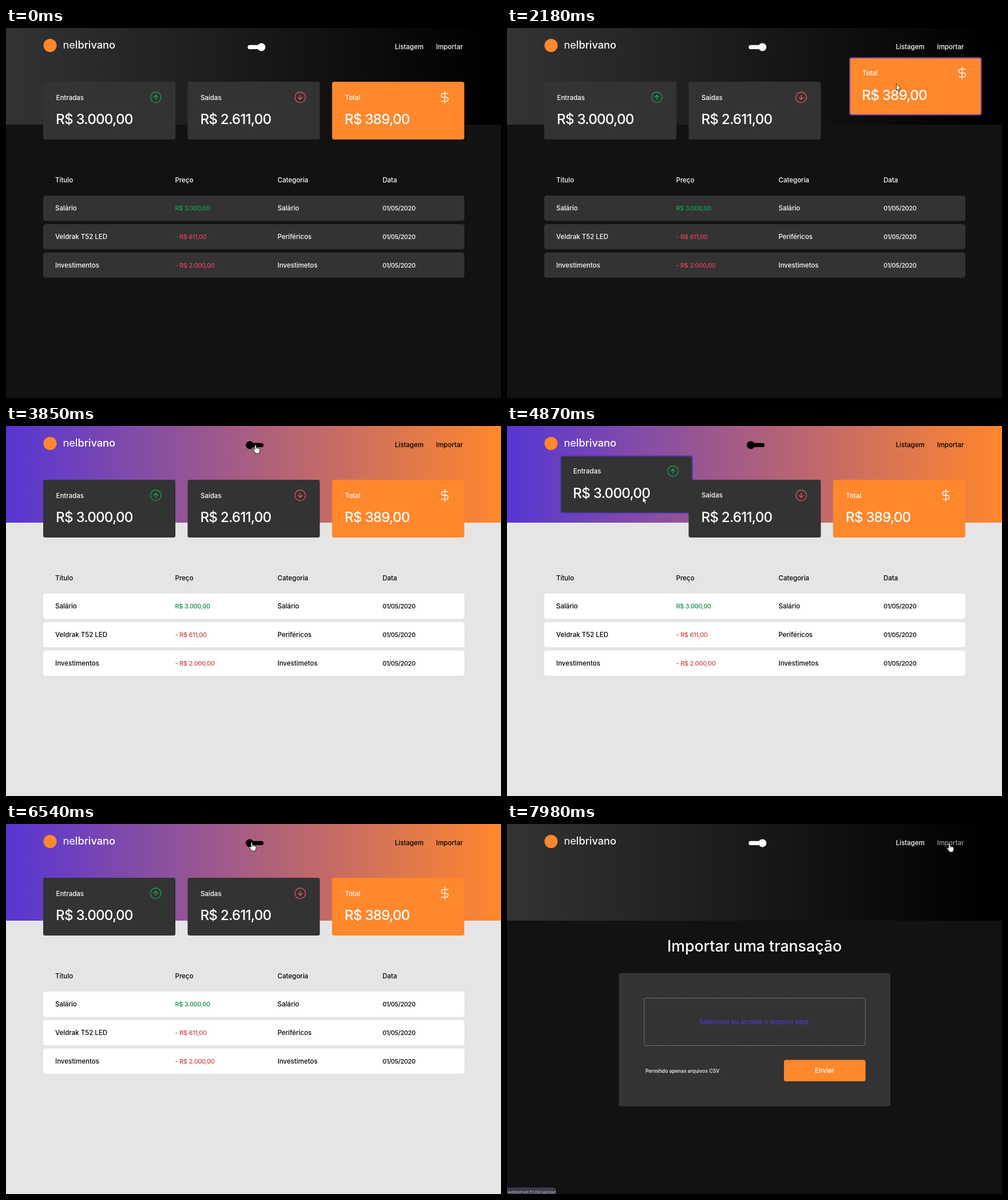
Recreate the animation shown at these times as an HTML page. Size 865 by 647 pixels, loop 8 s.

```html
<!DOCTYPE html>
<html lang="pt-BR">
<head>
<meta charset="utf-8">
<title>Painel</title>
<style>
  html, body { margin: 0; width: 100%; height: 100%; overflow: hidden; background: #121214; }
  svg { display: block; width: 100vw; height: 100vh; --ink: #fff; --row: #333; --in: #12a454; --out: #e83f5b; }
  svg.light { --ink: #000; --row: #fff; --in: #128f48; --out: #cf4545; }
  text { font: 550 11.5px Inter, sans-serif; fill: #fff; white-space: pre; }
  .ink { fill: var(--ink); }
  .in { fill: var(--in); }
  .out { fill: var(--out); }
  .light .ink, .light .in, .light .out { font-weight: 480; }
  .num { font-size: 11px; letter-spacing: -.035em; word-spacing: .03em; }
  .sum { font-size: 24.2px; letter-spacing: -.032em; }
  .brand { font-size: 18.2px; font-weight: 500; }
  .thin { font-weight: 400; }
  .title { font-size: 26.7px; }
  .drop { font-size: 11.35px; fill: #5636d3; }
  .hint { font-size: 8.6px; }
  .url { font: 400 8px Roboto, sans-serif; fill: #b9b9c0; }
  .mid { text-anchor: middle; }
  .line { fill: none; stroke-width: 1.4; stroke-linecap: round; stroke-linejoin: round; }
</style>
</head>
<body>
<svg id="stage" viewBox="0 0 865 647">
  <defs>
    <linearGradient id="night"><stop stop-color="#333"/><stop offset=".97" stop-color="#000"/></linearGradient>
    <linearGradient id="day"><stop stop-color="#5636d3"/><stop offset="1" stop-color="#ff872c"/></linearGradient>
  </defs>
  <rect id="back" width="865" height="647"/>
  <rect id="head" width="865" height="169"/>
  <circle cx="77" cy="30.5" r="11.5" fill="#ff872c"/>
  <text class="brand" x="99.5" y="35.5"><tspan class="thin">ne</tspan>lbrivano</text>
  <g id="toggle">
    <rect x="422.3" y="29.8" width="27.7" height="7.2" rx="3.6"/>
    <circle id="knob" cy="33.4" r="7"/>
  </g>
  <text id="list" class="ink" x="679.5" y="37">Listagem</text>
  <text id="import" class="ink" x="751.5" y="37">Importar</text>

  <g id="home"></g>

  <g id="upload">
    <text class="title mid" x="432.5" y="223">Importar uma transação</text>
    <rect x="195.5" y="260.8" width="474.5" height="232.7" rx="3.5" fill="#333"/>
    <rect x="239.7" y="304.6" width="386.4" height="82.8" rx="3" fill="none" stroke="#969cb3" stroke-dasharray="2.2 1.4"/>
    <text class="drop mid" x="432.5" y="350">Selecione ou arraste o arquivo aqui.</text>
    <text class="hint" x="242" y="434.5">Permitido apenas arquivos CSV</text>
    <rect x="484" y="412.5" width="142.5" height="37.5" rx="3.5" fill="#ff872c"/>
    <text class="mid" x="555" y="435.3">Enviar</text>
  </g>

  <g id="status">
    <rect x="-2" y="636.3" width="86.5" height="13" rx="2" fill="#3a3a4a" stroke="#50505e" stroke-width=".7"/>
    <text id="url" class="url" x="1" y="645.6"></text>
  </g>

  <g id="arrow" stroke="#000" stroke-width=".8" fill="#fff">
    <path d="M0 0V11.3L2.6 8.9L4.3 12.9L6.2 12.1L4.5 8.2H8Z"/>
  </g>
  <g id="hand" stroke="#000" stroke-width=".8" stroke-linejoin="round" fill="#fff">
    <path d="M-1.3 .8Q0 -.8 1.3 .8V5Q2.7 4.2 3.7 5.4Q5 4.8 6 6Q7.6 5.6 7.8 7.2V10.2L6.5 13V15H-.5V13.4L-4.4 8.6Q-4.2 6.8 -2.6 7.6L-1.3 8.8Z"/>
    <path d="M1.3 5V8M3.7 5.6V8M6 6.2V8" fill="none" stroke-width=".6"/>
  </g>
  <g id="beam" fill="none" stroke="#3b3b3b" stroke-width="1">
    <path d="M-2.6 -5.5H-.8L0 -4.8L.8 -5.5H2.6M0 -4.8V4.8M-2.6 5.5H-.8L0 4.8L.8 5.5H2.6"/>
  </g>
</svg>
<script>
const LOOP = 8000, TURN = 200, SLIDE = 250, LIFT = [28.5, -42.5];
const LIGHT_ON = 3320, LIGHT_OFF = 6836, PAGE_SWAP = 7930;
const $ = id => document.getElementById(id);
const stage = $('stage');

// Hover spans: [start, end]
const cardHover = [
  [[840, 1350], [4690, 5200]],
  [[1505, 1800], [4640, 4680], [5200, 5620]],
  [[1800, 2290], [5620, 6190]]
];
const linkHover = { list: [[130, 370], [7420, 7540]], import: [[7650, 8000]] };

// Pointer path: time, x, y, shape from here on
const path = [
  [30, 762, 44, 'arrow'], [130, 730, 36, 'hand'], [330, 700, 34, 'hand'], [370, 675, 50, 'arrow'],
  [780, 320, 82, 'arrow'], [870, 270, 110, 'arrow'], [1000, 205, 125, 'arrow'], [1200, 240, 120, 'arrow'],
  [1350, 328, 88, 'arrow'], [1430, 378, 92, 'arrow'], [1510, 429, 115, 'arrow'], [1660, 450, 122, 'arrow'],
  [1710, 470, 122, 'arrow'], [1800, 577, 124, 'arrow'], [1900, 676, 124, 'beam'], [2130, 690, 118, 'arrow'],
  [2290, 660, 55, 'arrow'], [2510, 600, 44, 'arrow'], [2850, 470, 42, 'arrow'], [2930, 450, 36, 'hand'],
  [3100, 441, 33, 'hand'], [3240, 439, 33, 'hand'], [3340, 436, 33, 'hand'], [3850, 436, 33, 'hand'],
  [4060, 427, 34, 'hand'], [4360, 436, 34, 'hand'], [4540, 436, 35, 'hand'], [4580, 425, 65, 'arrow'],
  [4640, 390, 98, 'arrow'], [4690, 300, 118, 'arrow'], [4920, 220, 125, 'arrow'], [5100, 220, 125, 'arrow'],
  [5200, 326, 125, 'arrow'], [5350, 440, 125, 'beam'], [5560, 520, 125, 'arrow'], [5620, 577, 126, 'arrow'],
  [5665, 676, 126, 'beam'], [5850, 690, 126, 'beam'], [6080, 690, 126, 'beam'], [6130, 660, 90, 'arrow'],
  [6200, 600, 52, 'arrow'], [6400, 450, 36, 'hand'], [6550, 428, 32, 'hand'], [6840, 425, 31, 'hand'],
  [7050, 425, 31, 'hand'], [7150, 452, 33, 'arrow'], [7420, 680, 34, 'hand'], [7540, 732, 34, 'arrow'],
  [7650, 756, 34, 'hand'], [7740, 770, 34, 'hand'], [7980, 773, 34, 'hand']
];

const box = (x, y, w, h, r, attrs) =>
  `<rect x="${x}" y="${y}" width="${w}" height="${h}" rx="${r}" ${attrs}/>`;
const label = (x, y, s, cls = '') => `<text x="${x}" y="${y}" class="${cls}">${s}</text>`;

function arrowIcon(color, dir) {
  return `<g class="line" stroke="${color}" transform="translate(196.7 27.3) scale(1 ${dir})">
    <circle r="9.3"/><path d="M0 3.8V-3.8M-3.7 0L0 -3.8L3.7 0"/></g>`;
}
const dollarIcon = `<g class="line" stroke="#fff" transform="translate(197 27.3)">
  <path d="M0 -10.3V10.3M5.6 -6.8H-2.4A3.4 3.4 0 0 0 -2.4 0H2.4A3.4 3.4 0 0 1 2.4 6.8H-6"/></g>`;

function card(i, x, name, sum, fill, icon) {
  return `<g id="card${i}" data-x="${x}">
    ${box(0, 0, 231, 101, 3.5, `fill="${fill}"`)}
    ${box(.7, .7, 229.6, 99.6, 3, `id="edge${i}" fill="none" stroke="#5636d3" stroke-width="1.5"`)}
    ${label(22.5, 31.5, name)}${label(22, 74.3, sum, 'sum')}${icon}</g>`;
}

const cols = [86, 295.5, 474.5, 658];
function row(y, name, price, kind, group) {
  const base = y + 26.2;
  return box(65, y, 736, 44.2, 4.5, 'style="fill:var(--row)"') +
    label(cols[0], base, name, 'ink') + label(cols[1], base, price, 'num ' + kind) +
    label(cols[2], base, group, 'ink') + label(cols[3], base, '01/05/2020', 'num ink');
}

$('home').innerHTML =
  ['Título', 'Preço', 'Categoria', 'Data'].map((s, i) => label(cols[i], 269.5, s, 'ink')).join('') +
  row(293, 'Salário', 'R$ 3.000,00', 'in', 'Salário') +
  row(342.9, 'Veldrak T52 LED', '- R$ 611,00', 'out', 'Periféricos') +
  row(392.6, 'Investimentos', '- R$ 2.000,00', 'out', 'Investimetos') +
  card(0, 65, 'Entradas', 'R$ 3.000,00', '#333', arrowIcon('#12a454', 1)) +
  card(1, 317.4, 'Saídas', 'R$ 2.611,00', '#333', arrowIcon('#e5525f', -1)) +
  card(2, 569.8, 'Total', 'R$ 389,00', '#ff872c', dollarIcon);

// cubic-bezier(.25, .1, .25, 1)
function ease(x) {
  if (x <= 0) return 0;
  if (x >= 1) return 1;
  let lo = 0, hi = 1;
  for (let i = 0; i < 24; i++) {
    const u = (lo + hi) / 2, v = 1 - u;
    if (.75 * v * v * u + .75 * v * u * u + u ** 3 < x) lo = u; else hi = u;
  }
  const v = 1 - lo;
  return .3 * v * v * lo + 3 * v * lo * lo + lo ** 3;
}

const hover = (spans, t, d = TURN) => Math.max(...spans.map(([a, b]) =>
  t < b ? ease((t - a) / d) : ease((b - a) / d) * (1 - ease((t - b) / d))));
const inside = (spans, t) => spans.some(([a, b]) => t >= a && t < b);
const mix = (a, b, p) => a + (b - a) * p;
const rgb = (a, b, p) => `rgb(${a.map((v, i) => Math.round(mix(v, b[i], p)))})`;
const show = (id, on) => { $(id).style.display = on ? '' : 'none'; };

function pointer(t) {
  let i = -1;
  while (i + 1 < path.length && path[i + 1][0] <= t) i++;
  const a = path[i], b = path[i + 1] || a;
  for (const id of ['arrow', 'hand', 'beam']) show(id, a && a[3] === id);
  if (!a) return;
  const p = b === a ? 0 : (t - a[0]) / (b[0] - a[0]);
  $(a[3]).setAttribute('transform', `translate(${mix(a[1], b[1], p)} ${mix(a[2], b[2], p)})`);
}

function draw(t) {
  const lit = [[LIGHT_ON, LIGHT_OFF]];
  const light = inside(lit, t), slide = hover(lit, t, SLIDE);
  stage.classList.toggle('light', light);
  $('head').setAttribute('fill', light ? 'url(#day)' : 'url(#night)');
  $('back').setAttribute('fill', rgb([18, 18, 19], [229, 229, 229], hover(lit, t)));
  $('toggle').setAttribute('fill', rgb([255, 255, 255], [0, 0, 0], slide));
  $('knob').setAttribute('cx', mix(446.3, 426, slide));

  cardHover.forEach((spans, i) => {
    const p = hover(spans, t), el = $('card' + i);
    el.setAttribute('transform', `translate(${+el.dataset.x + LIFT[0] * p} ${94 + LIFT[1] * p})`);
    $('edge' + i).setAttribute('opacity', p);
  });

  for (const id in linkHover) $(id).setAttribute('opacity', 1 - .4 * hover(linkHover[id], t));
  const onList = inside(linkHover.list, t);
  show('status', onList || inside(linkHover.import, t));
  $('url').textContent = onList ? 'webserver:5100' : 'webserver:5100/upload';

  show('home', t < PAGE_SWAP);
  show('upload', t >= PAGE_SWAP);
  pointer(t);
}

const start = performance.now();
function tick() {
  draw((performance.now() - start) % LOOP);
  requestAnimationFrame(tick);
}
tick();
</script>
</body>
</html>
```
